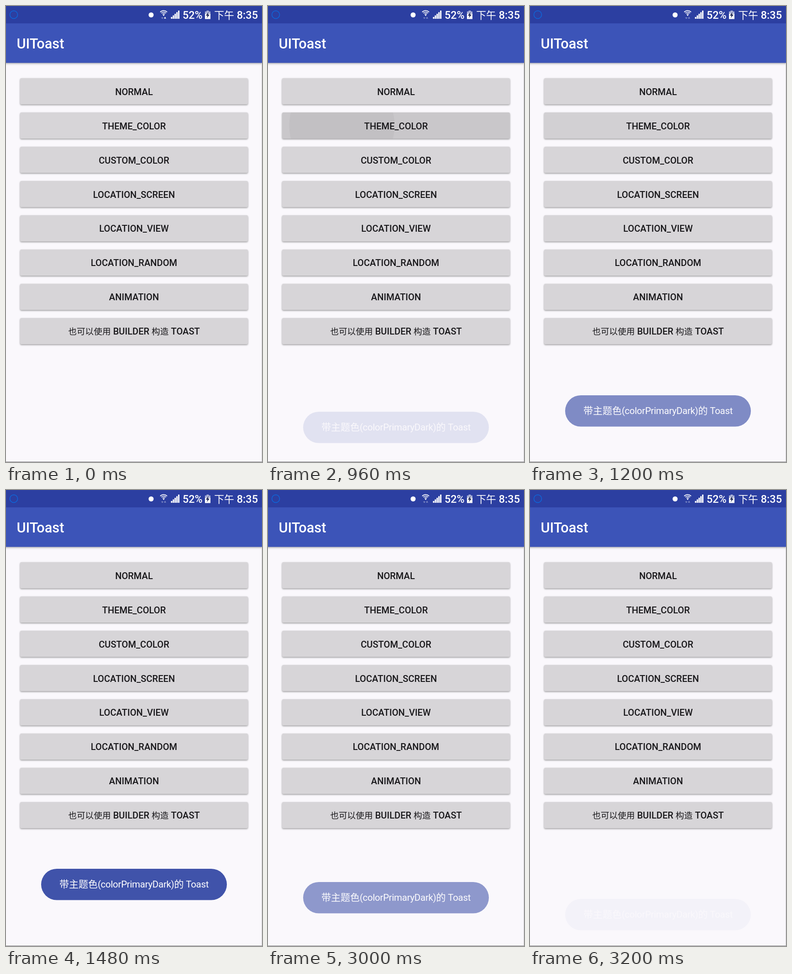
An HTML page with a canvas that plays this animation: 561x998 px, repeating every 3.36 s.

```html
<!DOCTYPE html>
<html lang="zh">
<head>
<meta charset="utf-8">
<title>UIToast</title>
<style>
  html, body { margin: 0; width: 100%; height: 100%; overflow: hidden; background: #faf8fc; }
  canvas { position: absolute; left: 0; top: 0; display: block; }
  #toast { left: 77px; top: 829px; opacity: 0; }
</style>
</head>
<body>
<canvas id="screen" width="561" height="998"></canvas>
<canvas id="toast" width="407" height="69"></canvas>
<script>
const LOOP = 3360, STEP = 40;
const W = 561, H = 998;
const LATIN = 'Roboto, sans-serif';
const CJK = '"Noto Sans CJK SC", "Noto Sans CJK", sans-serif';
const LABELS = ['NORMAL', 'THEME_COLOR', 'CUSTOM_COLOR', 'LOCATION_SCREEN',
  'LOCATION_VIEW', 'LOCATION_RANDOM', 'ANIMATION', '也可以使用 BUILDER 构造 TOAST'];

const toast = document.getElementById('toast');
const ctx = document.getElementById('screen').getContext('2d');

const clamp = (x, lo = 0, hi = 1) => Math.min(hi, Math.max(lo, x));
const ramp = (t, from, to) => clamp((t - from) / (to - from));
const lerp = (a, b, k) => a + (b - a) * k;
const ease = k => (1 - Math.cos(Math.PI * k)) / 2;

function rect(c, color, x, y, w, h) {
  c.fillStyle = color;
  c.fillRect(x, y, w, h);
}

function roundRect(c, x, y, w, h, r) {
  c.beginPath();
  c.roundRect(x, y, w, h, r);
}

// Mixed text: Chinese runs are set in their own face and size.
function text(c, str, x, y, { size, cjk = size * 0.93, weight = 500, color = '#fff', align = 0, spacing = 0 }) {
  const runs = str.match(/[\u4e00-\u9fff]+|[^\u4e00-\u9fff]+/g).map(s => {
    const han = /[\u4e00-\u9fff]/.test(s);
    const font = han ? `400 ${cjk}px ${CJK}` : `${weight} ${size}px ${LATIN}`;
    const gap = (han ? 0 : spacing) + 'px';
    c.font = font;
    c.letterSpacing = gap;
    return { s, font, gap, width: c.measureText(s).width };
  });
  x -= align * runs.reduce((sum, r) => sum + r.width, 0);
  c.fillStyle = color;
  for (const r of runs) {
    c.font = r.font;
    c.letterSpacing = r.gap;
    c.fillText(r.s, x, y);
    x += r.width;
  }
}

function polygon(c, color, points) {
  c.fillStyle = color;
  c.beginPath();
  points.forEach(([x, y]) => c.lineTo(x, y));
  c.fill();
}

function drawWifi(c, active) {
  c.strokeStyle = '#fff';
  c.lineWidth = 1.7;
  for (const r of [3.6, 7, 10.4]) {
    c.beginPath();
    c.arc(345.5, 20.5, r, -Math.PI * 0.76, -Math.PI * 0.24);
    c.stroke();
  }
  c.fillStyle = '#fff';
  c.beginPath();
  c.arc(345.5, 20, 1.6, 0, Math.PI * 2);
  c.fill();
  const arrow = active ? '#fff' : '#7f8bc6';
  polygon(c, '#7f8bc6', [[340, 25], [345, 25], [342.5, 28.5]]);
  polygon(c, arrow, [[346, 27.5], [351, 27.5], [348.5, 23.5]]);
}

function drawStatusBar(c, t) {
  rect(c, '#2c3fa1', 0, 0, W, 38);
  c.strokeStyle = '#0d68dc';
  c.lineWidth = 1.5;
  c.beginPath();
  c.arc(17, 19, 8.5, 0, Math.PI * 2);
  c.stroke();

  c.fillStyle = '#fff';
  c.beginPath();
  c.arc(318, 19.5, 5.5, 0, Math.PI * 2);
  c.fill();

  drawWifi(c, t < 80);
  for (let i = 0; i < 5; i++) {
    const h = 4 + i * 3.5;
    rect(c, '#fff', 361.5 + i * 3.9, 28 - h, 3, h);
  }
  text(c, '52%', 387, 28, { size: 23.3 });

  rect(c, '#a9b0d6', 439.5, 10, 5, 3);
  rect(c, '#a9b0d6', 436, 12, 12, 6);
  rect(c, '#fff', 436, 17, 12, 11.5);
  polygon(c, '#1b2350', [[443.5, 13.5], [438, 21], [441.5, 21], [440, 26.5], [446, 18.8], [442.5, 18.8]]);

  text(c, '下午 8:35', 552, 28, { size: 23.5, align: 1 });
}

function drawAppBar(c) {
  c.save();
  c.shadowColor = 'rgba(0,0,0,.4)';
  c.shadowBlur = 5;
  c.shadowOffsetY = 1.5;
  rect(c, '#3c54b8', -10, 30, W + 20, 94.5);
  c.restore();
  text(c, 'UIToast', 23.5, 93.3, { size: 30.7 });
}

// Press highlight and the circle spreading towards the button centre.
function drawRipple(c, t, y) {
  const glow = 0.08 * ramp(t, 540, 660) * (1 - ramp(t, 880, 1320));
  if (!glow) return;
  c.save();
  c.clip();
  rect(c, `rgba(0,0,0,${glow})`, 30, y, 502, 58);
  const k = 0.46 * ramp(t, 540, 960) + 0.54 * ramp(t, 960, 1100);
  const alpha = 0.06 * ramp(t, 540, 620) * (1 - ramp(t, 880, 1080));
  c.fillStyle = `rgba(0,0,0,${alpha})`;
  c.beginPath();
  c.arc(lerp(61, 280.5, k), y + 28.5, 251 * k, 0, Math.PI * 2);
  c.fill();
  c.restore();
}

function drawButton(c, label, i, t) {
  const y = Math.round(158 + 74.95 * i);
  c.save();
  c.shadowColor = 'rgba(0,0,0,.4)';
  c.shadowBlur = 3.5;
  c.shadowOffsetY = 1.5;
  c.fillStyle = '#d7d5d8';
  roundRect(c, 31, y, 499, 57.3, 3);
  c.fill();
  c.restore();
  if (i === 1) drawRipple(c, t, y);
  text(c, label, 280.5, 195 + 74.86 * i, { size: 20.1, color: '#18171a', align: 0.5 });
}

function drawToast(c) {
  c.fillStyle = '#4053aa';
  roundRect(c, 0, 0, 407, 68.5, 34.25);
  c.fill();
  text(c, '带主题色(colorPrimaryDark)的 Toast', 203.5, 41,
    { size: 20.5, cjk: 21, weight: 400, align: 0.5, spacing: -0.3 });
}

function toastLevel(t) {
  return t < 2800
    ? ease(ramp(t, 808, 1458))
    : 1 - ease(ramp(Math.min(t, 3200), 2795, 3250));
}

function frame(now) {
  const t = Math.floor((now % LOOP) / STEP) * STEP;
  rect(ctx, '#faf8fc', 0, 0, W, H);
  drawAppBar(ctx);
  drawStatusBar(ctx, t);
  LABELS.forEach((label, i) => drawButton(ctx, label, i, t));
  rect(ctx, '#d4d3d7', W - 1, 125, 1, H - 125);
  rect(ctx, '#8b8a8e', 0, H - 1, W, 1);

  const level = toastLevel(t);
  toast.style.opacity = level;
  toast.style.transform = `translateY(${Math.round((1 - level) * 68)}px)`;
}

drawToast(toast.getContext('2d'));
const start = performance.now();
function tick() {
  frame(performance.now() - start);
  requestAnimationFrame(tick);
}
tick();
</script>
</body>
</html>
```
